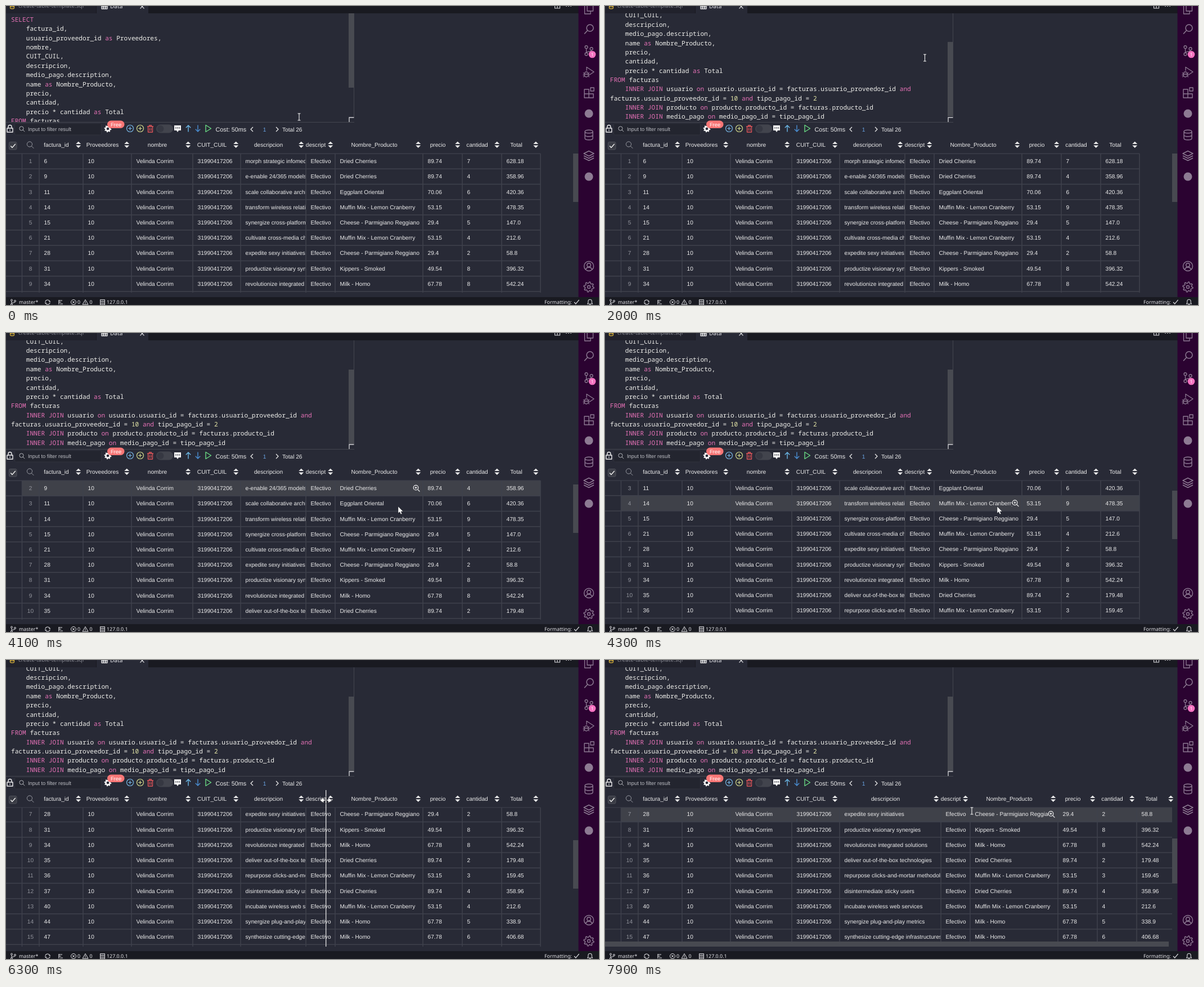
These frames come from a looping animation (1054x531 px, 8000 ms). An HTML page:

```html
<!DOCTYPE html>
<html lang="es">
<head>
<meta charset="utf-8">
<title>SQL result</title>
<style>
html, body { margin: 0; width: 100%; height: 100%; overflow: hidden; background: #282a36; }
svg { display: block; width: 1054px; height: 531px; }
text { fill: #ececec; white-space: pre; text-rendering: geometricPrecision; font: 10.14px "Liberation Sans", Arial, sans-serif; }
.code text { font: 11.15px "Noto Sans Mono", "DejaVu Sans Mono", monospace; fill: #f0f0ec; }
.code .kw { fill: #e571b6; }
.code .num { fill: #e4e6a8; }
.ui text, text.ui { font-family: "Noto Sans", "Open Sans", sans-serif; font-size: 8.9px; fill: #e6e6ea; }
.mid { text-anchor: middle; }
</style>
</head>
<body>
<svg id="stage" viewBox="0 0 1054 531" xmlns="http://www.w3.org/2000/svg"></svg>
<script>
const LOOP = 8000, ROW = 27.22, TOP = 262, LINE = 16.36, CHAR = 6.69;
const BG = '#282a36', GRID = '#3f414c', HOVER = '#3f4149', THUMB = '#484a51';

// Markup helpers
const rect = (x, y, w, h, fill, more = '') => `<rect x="${x}" y="${y}" width="${w}" height="${h}" fill="${fill}" ${more}/>`;
const text = (x, y, s, more = '') => `<text x="${x}" y="${y}" ${more}>${s}</text>`;
const dot = (x, y, r, fill) => `<circle cx="${x}" cy="${y}" r="${r}" fill="${fill}"/>`;
const icon = (x, y, d, color, w = 1.2, fill = 'none') =>
  `<path transform="translate(${x} ${y})" d="${d}" stroke="${color}" stroke-width="${w}" fill="${fill}" stroke-linejoin="round"/>`;
const ring = (r, x = 0, y = 0) => `M${x - r} ${y}a${r} ${r} 0 1 0 ${2 * r} 0a${r} ${r} 0 1 0 ${-2 * r} 0`;
const drum = (w, h) => `M${-w} ${-h}a${w} ${w * .4} 0 1 0 ${2 * w} 0a${w} ${w * .4} 0 1 0 ${-2 * w} 0V${h}a${w} ${w * .4} 0 0 0 ${2 * w} 0V${-h}M${-w} 0a${w} ${w * .4} 0 0 0 ${2 * w} 0`;
const lens = r => ring(r) + `M${r * .7} ${r * .7}l${r * .9} ${r * .9}`;
const gear = (r, teeth, depth) => {
  let d = '';
  for (let i = 0; i < teeth * 4; i++) {
    const a = (i + .5) * Math.PI / teeth / 2, q = i % 4 < 2 ? r : r - depth;
    d += `${i ? 'L' : 'M'}${(q * Math.cos(a)).toFixed(2)} ${(q * Math.sin(a)).toFixed(2)}`;
  }
  return d + 'Z';
};

// Query editor
const sql = `SELECT
    factura_id,
    usuario_proveedor_id as Proveedores,
    nombre,
    CUIT_CUIL,
    descripcion,
    medio_pago.description,
    name as Nombre_Producto,
    precio,
    cantidad,
    precio * cantidad as Total
FROM facturas
    INNER JOIN usuario on usuario.usuario_id = facturas.usuario_proveedor_id and
facturas.usuario_proveedor_id = 10 and tipo_pago_id = 2
    INNER JOIN producto on producto.producto_id = facturas.producto_id
    INNER JOIN medio_pago on medio_pago_id = tipo_pago_id`;
const paint = s => s
  .replace(/\b\d+\b/g, '<tspan class="num">$&</tspan>')
  .replace(/\b(SELECT|FROM|INNER JOIN|as|on|and)\b/g, '<tspan class="kw">$&</tspan>');
const codeLines = sql.split('\n').map((line, i) => {
  const body = line.trimStart();
  return text(9 + (line.length - body.length) * CHAR, 28 + i * LINE, paint(body));
}).join('');

const editor = `
  <g class="code" clip-path="url(#codeClip)"><g id="code">${codeLines}</g></g>
  ${rect(609, 13, 10, 132, THUMB, 'id="codeThumb"')}
  <path d="M0 206.5H619M618.5 13V206" stroke="#44464f" fill="none"/>
  ${rect(609, 197, 10, 9, BG)}
  <path d="M610 206V198H618.5" stroke="#d4d4d8" stroke-width="1.3" fill="none"/>`;

// Result table
const cols = [
  ['factura_id', 59, 137], ['Proveedores', 137, 223], ['nombre', 223, 332], ['CUIT_CUIL', 332, 417],
  ['descripcion', 417, 533], ['descript', 533, 585], ['Nombre_Producto', 585, 741],
  ['precio', 741, 811], ['cantidad', 811, 881], ['Total', 881, 950]
];
const goods = {
  D: ['Dried Cherries', 89.74], E: ['Eggplant Oriental', 70.06], M: ['Muffin Mix - Lemon Cranberry', 53.15],
  C: ['Cheese - Parmigiano Reggiano', 29.4], K: ['Kippers - Smoked', 49.54], H: ['Milk - Homo', 67.78]
};
const data = `6 D 7 morph strategic infomediaries
9 D 4 e-enable 24/365 models
11 E 6 scale collaborative architectures
14 M 9 transform wireless relationships
15 C 5 synergize cross-platform systems
21 M 4 cultivate cross-media channels
28 C 2 expedite sexy initiatives
31 K 8 productize visionary synergies
34 H 8 revolutionize integrated solutions
35 D 2 deliver out-of-the-box technologies
36 M 3 repurpose clicks-and-mortar methodologies
37 D 4 disintermediate sticky users
40 M 4 incubate wireless web services
44 H 5 synergize plug-and-play metrics
47 H 6 synthesize cutting-edge infrastructures`.split('\n').map(s => s.match(/(\d+) (\w) (\d+) (.*)/).slice(1));
const money = n => { const v = +n.toFixed(2); return Number.isInteger(v) ? v + '.0' : v; };

let left = '', right = '', notes = '';
data.forEach(([id, good, qty, note], i) => {
  const [name, price] = goods[good], y = TOP + i * ROW + 17.1;
  const cell = (c, s) => text(cols[c][1] + 8.5, y, s);
  left += text(43.5, y, i + 1, 'class="mid" style="fill:#92949c"') +
    cell(0, id) + cell(1, 10) + cell(2, 'Velinda Corrim') + cell(3, '31990417206');
  notes += cell(4, note);
  right += cell(5, 'Efectivo') + cell(6, name) + cell(7, price) + cell(8, qty) + cell(9, money(price * qty));
});
const vline = x => `M${x} 0V531`;
const title = ([name, a, b]) => text((a + b) / 2 - 8.5, 250, name, 'class="mid"');
const sorter = ([, , b]) => icon(b - 8.3, 246.3, 'M-4.5 -1.2L0 -5.6L4.5 -1.2ZM-4.5 1.2L0 5.6L4.5 1.2Z', 'none', 0, '#ececec');
const head = c => title(c) + sorter(c);
const rowLines = end => Array.from({ length: 18 }, (_, i) => `M0 ${(TOP + i * ROW).toFixed(2)}H${end}`).join('');

const table = `
  ${cols.slice(0, 4).map(head).join('')}
  <g id="noteTitle">${title(cols[4])}</g>
  <g class="shift">${sorter(cols[4])}${cols.slice(5).map(head).join('')}</g>
  ${rect(5.5, 241.5, 13.5, 13.5, '#3a3c45', 'rx="2" stroke="#50525b"')}
  ${icon(12.3, 248.3, 'M-4 .3L-1.3 3.2L4.5 -3.3', '#f0f0f0', 1.4)}
  ${icon(42, 245.5, lens(4.6), '#9a9ca4', 1)}
  <g clip-path="url(#bodyClip)">
    <g id="rows">
      <rect id="hover" x="28.5" height="${ROW}" fill="${HOVER}"/>
      <path id="lines" stroke="${GRID}" stroke-width="1.5"/>
      ${left}
      <g clip-path="url(#noteClip)">${notes}</g>
      <g class="shift">${right}
        <g id="zoom">${rect(723.5, -9, 15, 18, HOVER)}${icon(728.5, -1, lens(4.3) + 'M-2 0H2M0 -2V2', '#f2f2f2')}</g>
      </g>
    </g>
    <path d="${[28.5, 59, 137, 223, 332, 417].map(vline).join('')}" stroke="${GRID}" stroke-width="1.5"/>
    <path class="shift" d="${[533, 585, 741, 811, 881, 950].map(vline).join('')}" stroke="${GRID}" stroke-width="1.5"/>
  </g>
  <path id="headLine" stroke="${GRID}" stroke-width="1.2"/>
  ${rect(1008, TOP, 9.5, 86, THUMB, 'id="thumb"')}
  ${rect(0, 500, 1002, 9, THUMB, 'id="hThumb"')}`;

// Toolbar between editor and table
const plus = ring(6) + 'M-3.3 0H3.3M0 -3.3V3.3';
const toolbar = `
  ${icon(7, 218, 'M-5 -1H5V6H-5ZM-3 -1V-3.5a3 3 0 0 1 6 0V-1M0 1.5V3.5', '#f0f0f0', 1.4)}
  ${rect(15.5, 208.5, 154, 20.5, '#23252f', 'rx="2" stroke="#30323d"')}
  ${icon(27.5, 217.5, lens(3.6), '#b4b5bb', 1)}
  ${text(39, 222, 'Input to filter result', 'style="font-size:9.36px;fill:#bcbdc3"')}
  ${icon(181, 218, gear(6.5, 8, 1.6), 'none', 0, '#f4f4f4')}${dot(181, 218, 2.3, BG)}
  ${rect(180, 203.5, 30.5, 13.5, '#f77676', 'rx="6.7"')}
  ${text(195.5, 213.6, 'Free', 'class="mid" style="font-size:9.36px;fill:#fff"')}
  ${icon(220.5, 217.5, plus, '#78b7e6')}${icon(238.5, 217.5, plus, '#d5dc8c')}
  ${icon(256.5, 218, 'M-5.5 -4H5.5M-2 -4V-6H2V-4M-4 -4V6H4V-4M-1.5 -1.5V3.5M1.5 -1.5V3.5', '#e0555a', 1.3)}
  ${rect(267, 210.5, 30, 15, '#42444d', 'rx="7.5"')}${dot(274.5, 218, 6, '#363842')}
  ${icon(305, 218, 'M-6 -6H6V3H2L0 6L-2 3H-6Z', 'none', 0, '#f4f4f4')}
  ${[302, 305, 308].map(x => dot(x, 216.5, .9, BG)).join('')}
  ${icon(324, 217.5, 'M0 6V-5.5M-4.2 -1.3L0 -5.5L4.2 -1.3', '#6cb9e8', 1.4)}
  ${icon(341, 217.5, 'M0 -6V5.5M-4.2 1.3L0 5.5L4.2 1.3', '#4a8fd4', 1.4)}
  ${icon(359.5, 217.5, 'M-4.5 -6L5 0L-4.5 6Z', '#69d983', 1.4)}
  ${text(372.5, 222.8, 'Cost: 50ms', 'style="font-size:10.8px"')}
  ${icon(437, 219, 'M2 -4L-2 0L2 4', '#ececec')}
  ${text(459.5, 222.8, '1', 'class="mid" style="fill:#6aa5e6"')}
  ${icon(482, 219, 'M-2 -4L2 0L-2 4', '#ececec')}
  ${text(491, 222.8, 'Total 26')}`;

// Window frame: tabs, activity bar, status bar
const SIDE = '#8d7b93', PALE = '#dcdce0';
const frame = `
  ${rect(0, 0, 1018, 13, '#191a21')}${rect(0, 0, 160, 13, '#21222c')}${rect(161, 0, 92, 13, BG)}
  <g class="ui">
    ${icon(11, 0, drum(3.5, 3.5), '#d9b23c', 1.2)}
    ${text(22, 3.3, 'create-table-template.sql', 'style="font-size:9.9px;fill:#85868f"')}
    ${icon(175, 0, 'M-5 -5H5V5H-5ZM-5 -2H5M-5 1.5H5M-1.7 -2V5M1.7 -2V5', '#f0f0f0', 1.3)}
    ${text(185, 3.6, 'Data', 'style="font-size:10.1px"')}
    ${icon(242, 1, 'M-3.5 -3.5L3.5 3.5M3.5 -3.5L-3.5 3.5', PALE)}
    ${icon(980, 0, 'M-4.5 -4H4.5V4H-4.5ZM0 -4V4', PALE, 1.1)}
    ${[996, 1000, 1004].map(x => dot(x, 0, 1, PALE)).join('')}
  </g>
  ${rect(0, 517, 1054, 14, '#191a21')}
  ${rect(1017.5, 0, 37, 517, '#2b0331')}
  ${icon(1036, 4, 'M-3 -10H4L7.5 -6V5H-3ZM-3 -5H-7.5V10H3V5', SIDE, 1.3)}
  ${icon(1038, 39, ring(6) + 'M-4.3 4.3L-10 10.5', SIDE, 1.5)}
  ${icon(1036, 79, ring(2.5, -4.5, -6) + ring(2.5, -4.5, 6.5) + ring(2.5, 4.5, -3) + 'M-4.5 -3.5V4M4.5 -.5C4.5 2 2 2 -1 2.2C-3 2.5 -4.5 3 -4.5 4', SIDE, 1.3)}
  ${dot(1042, 86, 6.3, '#f472c0')}${text(1042, 88.8, '1', 'class="ui mid" style="font-size:8px;fill:#fff"')}
  ${icon(1036, 117, 'M-4 -2V-8.5L9 0L0 6M-8 4a3.5 4 0 1 1 7 0v1a3.5 4 0 1 1 -7 0ZM-8 4H-1M-10 1.5L-8 3M1 1.5L-1 3M-10.5 5.5H-8M1 5.5H-1M-10 9L-7.5 7.5M1 9L-1.5 7.5', SIDE, 1.3)}
  ${icon(1036, 154, 'M-8 -6H0V2H8V9H-8ZM-8 2H0V9M3 -9H9V-3H3Z', SIDE, 1.4)}
  ${dot(1036, 191, 7.5, SIDE)}
  ${icon(1036, 229, drum(7, 6), SIDE, 1.4)}
  ${icon(1036, 266, 'M0 -8.5L9 -4L0 .5L-9 -4ZM-9 0L0 4.5L9 0M-9 4L0 8.5L9 4', SIDE, 1.4)}
  ${dot(1036, 303, 7.5, SIDE)}
  ${icon(1036, 462, ring(8.5) + ring(3.3, 0, -2) + 'M-5.5 6.5C-4.5 .5 4.5 .5 5.5 6.5', SIDE, 1.4)}
  ${icon(1036, 499, gear(9, 8, 2.3) + ring(2.5), SIDE, 1.4)}
  <g class="ui">
    ${icon(13, 526, ring(1.5, -3, -3.5) + ring(1.5, -3, 4) + ring(1.5, 3, -2) + 'M-3 -2V2.5M3 -.5C3 1.5 -3 .5 -3 2.5', PALE, 1)}
    ${text(23, 529.3, 'master*')}
    ${icon(74, 526, 'M-4.2 -.5A4.2 4.2 0 0 1 3.8 -1.5M4.2 .5A4.2 4.2 0 0 1 -3.8 1.5M2 -1.3H5.2M-2 1.3H-5.2', PALE, 1.1)}
    ${icon(97, 526, 'M-3 -4V4M-3 -3H3M-3 0H1M-1 3H4', PALE, 1.2)}
    ${icon(120, 526, ring(4.5) + 'M-2 -2L2 2M2 -2L-2 2', PALE, 1)}${text(127, 529.3, '0')}
    ${icon(141, 526, 'M0 -4.5L5 4H-5ZM0 -1.5V1.5M0 2.3V3.2', PALE, 1)}${text(148.5, 529.3, '0')}
    ${icon(171.5, 526, 'M-4 -4.5H4V-1.8H-4ZM-4 -1.4H4V1.4H-4ZM-4 1.8H4V4.5H-4Z', PALE, 1)}
    ${text(179, 529.3, '127.0.0.1')}
    ${text(957, 529.3, 'Formatting:')}
    ${icon(1014, 526, 'M-4 0L-1.3 3L4.5 -4', PALE, 1.2)}
    ${icon(1038, 526, 'M-4.5 3H4.5L3.2 1V-1.5a3.2 3.2 0 0 0 -6.4 0V1ZM-1.2 4.5H1.2', PALE, 1.1)}
  </g>`;

const pointers = {
  arrow: icon(0, 0, 'M0 0V12L2.7 9.7L4.8 14L6.9 13L5 9H9Z', '#1b1c22', .5, '#fff'),
  beam: icon(0, 0, 'M-2.5 -6H-.5L0 -5.5L.5 -6H2.5M0 -5.5V5.5M-2.5 6H-.5L0 5.5L.5 6H2.5', '#f4f4f4', 1.1),
  resize: icon(0, 0, 'M-10.5 0L-4 -5V-1.5H-2V1.5H-4V5ZM10.5 0L4 -5V-1.5H2V1.5H4V5ZM-1 -6H1V6H-1Z', '#1b1c22', .6, '#fff')
};

document.getElementById('stage').innerHTML = `
  <defs>
    <clipPath id="codeClip">${rect(0, 13, 609, 193, '#000')}</clipPath>
    <clipPath id="bodyClip">${rect(0, TOP, 1008, 247, '#000', 'id="bodyBox"')}</clipPath>
    <clipPath id="noteClip">${rect(417, 0, 116, 900, '#000', 'id="noteBox"')}</clipPath>
  </defs>
  ${rect(0, 0, 1054, 531, BG)}${editor}${toolbar}${table}${frame}
  <path id="guide" d="M0 231V509" stroke="#f4f4f4" stroke-width="1.2"/>
  <g id="pointer">${Object.entries(pointers).map(([k, v]) => `<g id="${k}">${v}</g>`).join('')}</g>`;

// Each move: first step, last step, then the values it ends on
const pointerMoves = [
  [300, 300, 604, 160, 'arrow'], [400, 400, 659, 131, 'arrow'], [600, 600, 667, 124, 'arrow'],
  [700, 700, 612, 86, 'arrow'], [800, 800, 571, 91, 'arrow'], [2000, 2000, 568.5, 92, 'beam'],
  [2600, 2800, 569, 104, 'beam'], [3000, 3000, 569, 103, 'arrow'], [3200, 3400, 666, 229, 'arrow'],
  [3600, 3600, 684, 292, 'arrow'], [3800, 3800, 697, 308, 'arrow'], [4700, 4900, 626, 325, 'arrow'],
  [5000, 5300, 536, 226, 'arrow'], [5500, 5500, 531, 249, 'arrow'], [5600, 5600, 533.5, 249, 'resize'],
  [5900, 6300, 568.7, 249, 'resize'], [6400, 6700, 586, 249, 'resize'], [6800, 6800, 593, 249, 'resize'],
  [7000, 7000, 597, 249, 'resize'], [7300, 7700, 648, 260, 'arrow'], [7800, 7900, 652, 268, 'beam']
];
const codeMoves = [[1500, 1500, 1.6], [1600, 1800, 58], [1900, 1900, 69], [2000, 2000, 73], [2300, 2300, 74.7]];
const tableMoves = [
  [4000, 4000, 8, 3], [4100, 4100, 27.2, 7], [4200, 4300, 55, 18], [4700, 4800, 122, 27],
  [4900, 4900, 162.3, 34], [5000, 5000, 165, 45], [5100, 5300, 165, 58]
];
const hoverAt = [[0, 0], [3600, 1], [3800, 2], [4300, 4], [4800, 0], [7700, 7]];

function follow(moves, t, value) {
  for (const [a, b, ...to] of moves) {
    if (t < a) break;
    const k = Math.min(1, (t - a + 100) / (b - a + 100));
    value = value.map((v, i) => typeof v === 'string' ? to[i] : v + (to[i] - v) * k);
  }
  return value;
}

const $ = id => document.getElementById(id);
const set = (id, attrs) => { for (const k in attrs) $(id).setAttribute(k, attrs[k]); };
const move = (x, y) => ({ transform: `translate(${x} ${y})` });
const show = (id, on) => { $(id).style.display = on ? '' : 'none'; };
const shifted = document.querySelectorAll('.shift');

function draw(t) {
  const [scroll] = follow(codeMoves, t, [0]);
  set('code', move(0, -scroll));
  set('codeThumb', { y: 13 + scroll * .696 });

  const wide = t >= 7200, dx = wide ? 64 : 0, end = Math.min(1008, 950 + dx);
  const [rows, thumb] = follow(tableMoves, t, [0, 0]);
  set('rows', move(0, -rows));
  set('thumb', { y: TOP + (wide ? 55 : thumb), height: wide ? 80 : 86 });
  set('bodyBox', { height: wide ? 238 : 247 });
  set('noteBox', { width: 115.5 + dx });
  set('noteTitle', move(dx / 2, 0));
  shifted.forEach(g => g.setAttribute('transform', `translate(${dx} 0)`));
  set('lines', { d: rowLines(end) });
  set('headLine', { d: `M0 ${TOP}H${end}` });
  show('hThumb', wide);

  const hot = hoverAt.filter(h => h[0] <= t).pop()[1], y = TOP + (hot - 1) * ROW;
  show('hover', hot);
  show('zoom', hot);
  set('hover', { y, width: end - 28.5 });
  set('zoom', move(0, y + ROW / 2));

  const [px, py, shape] = follow(pointerMoves, t, [521, 197, 'beam']);
  set('pointer', move(px, py));
  for (const k in pointers) show(k, k === shape);
  show('guide', t >= 5900 && !wide);
  set('guide', move(t >= 6800 ? 597 : px, 0));
}

let last = -1;
function tick() {
  const t = Math.floor(performance.now() % LOOP / 100) * 100;
  if (t !== last) draw(last = t);
  requestAnimationFrame(tick);
}
tick();
</script>
</body>
</html>
```
